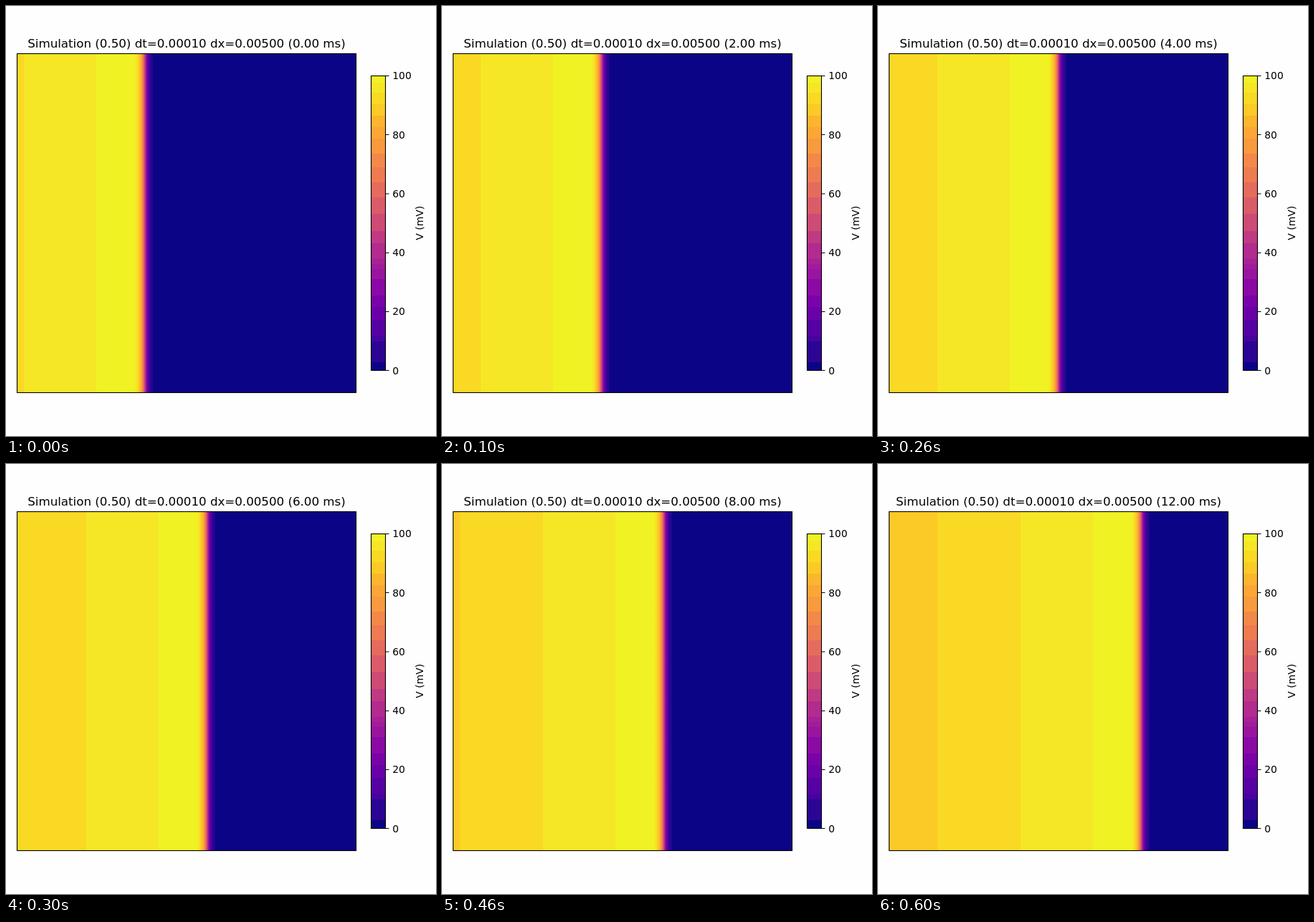
Write an HTML page that moves like this. It is 600 px wide and 600 px high and loops after 0.7 s.

```html
<!DOCTYPE html>
<html lang="en">
<head>
<meta charset="utf-8">
<title>Travelling wave</title>
<style>
@property --step { syntax: "<integer>"; inherits: true; initial-value: 0; }
@keyframes run { to { --step: 7; } }

html, body { margin: 0; width: 100%; height: 100%; overflow: hidden; background: #fefefe; }
body { position: relative; color: #000; font-family: "DejaVu Sans", sans-serif; }

#stage {
  position: absolute; left: 0; top: 0; width: 600px; height: 600px; overflow: hidden;
  animation: run 700ms steps(7, end) infinite;
}
#title {
  position: absolute; left: 0; top: 43px; width: 504px;
  font-size: 16.667px; line-height: 19px; text-align: center; white-space: nowrap;
}
#time { counter-reset: ms calc(var(--step) * 2); }
#time::before { content: counter(ms); }

#plot { position: absolute; left: 15px; top: 66px; width: 474px; height: 474px; overflow: hidden; }
#wave {
  position: absolute; left: -215px; top: 0; width: 700px; height: 474px;
  transform: translateX(calc(var(--step) * 29px));
  background: linear-gradient(90deg,
    #fcca26 109px, #f9d924 109px 225px, #f5e726 225px 326px, #f0f224 326px 379px,
    #f5e726 382px, #fad524 384.5px, #fdbe2a 387px, #fba238 389px, #f1814d 391px,
    #db5c68 392.7px, #b8328a 394.3px, #8b0aa5 396px, #6300a7 398px,
    #41049d 400px, #2a0593 402px, #1c068d 405px, #0b0486 405px);
}
#bar {
  position: absolute; left: 509px; top: 97px; width: 21px; height: 412px;
  background: linear-gradient(
    #f0f224 10px, #f5e726 10px 24px, #f9d924 24px 40px, #fcca26 40px 56px,
    #fdb52e 56px 72px, #fca636 72px 88px, #f99a3e 88px 109px, #f48849 109px 128px,
    #ee7b51 128px 149px, #e56b5d 149px 170px, #db5c68 170px 193px, #ce4b75 193px 217px,
    #c03a83 217px 234px, #b22b8f 234px 256px, #a72197 256px 263px, #a11b9b 263px 270px,
    #99159f 270px 284px, #8b0aa5 284px 307px, #7a02a8 307px 323px, #6a00a8 323px 341px,
    #5601a4 341px 363px, #46039f 363px 371px, #2c0594 371px 400px, #0b0486 400px);
}
svg { position: absolute; left: 0; top: 0; }
svg text { font-size: 13.889px; }
.line { fill: none; stroke: #000; stroke-width: 1.1; }
</style>
</head>
<body>
<div id="stage">
  <div id="title">Simulation (0.50) dt=0.00010 dx=0.00500 (<span id="time"></span>.00 ms)</div>
  <div id="plot"><div id="wave"></div></div>
  <div id="bar"></div>
  <svg width="600" height="600">
    <rect class="line" x="15.5" y="66.5" width="473" height="473"/>
    <rect class="line" x="509.5" y="97.5" width="20" height="411"/>
    <path class="line" d="M530 97.5h4.5M530 179.5h4.5M530 262h4.5M530 344.5h4.5M530 426.5h4.5M530 508.5h4.5"/>
    <text x="539.3" y="102">100</text>
    <text x="539.3" y="185">80</text>
    <text x="539.3" y="267">60</text>
    <text x="539.3" y="349">40</text>
    <text x="539.3" y="431">20</text>
    <text x="539.3" y="514">0</text>
    <text transform="translate(582 302.8) rotate(-90)" text-anchor="middle">V (mV)</text>
  </svg>
</div>
</body>
</html>
```
